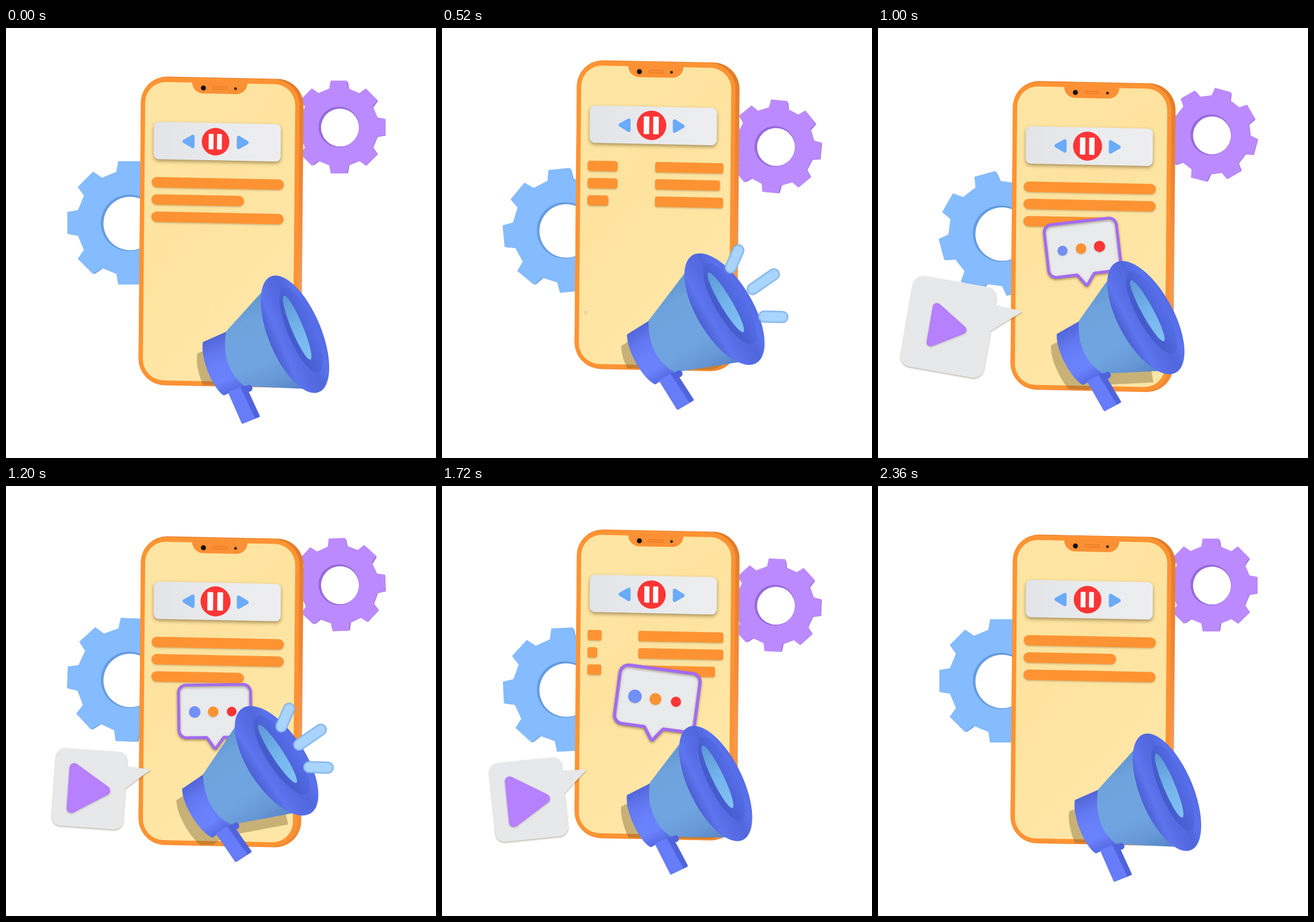
An HTML page with a canvas that plays this animation: 748x748 px, repeating every 2400 ms.

```html
<!DOCTYPE html>
<html>
<head>
<meta charset="utf-8">
<style>
  html, body { margin: 0; width: 100%; height: 100%; overflow: hidden; background: #fff; }
  canvas { display: block; width: 748px; height: 748px; }
</style>
</head>
<body>
<canvas id="stage" width="748" height="748"></canvas>
<script>
const ctx = document.getElementById('stage').getContext('2d');
const LOOP = 2400, STEP = 40, CYCLE = 2360, HALF = CYCLE / 2, BEAT = CYCLE / 3;
const TAU = 2 * Math.PI;
const rad = deg => deg * Math.PI / 180;
const clamp01 = v => Math.min(1, Math.max(0, v));
const ease = u => (1 - Math.cos(Math.PI * clamp01(u))) / 2;

// Eased travel through a few [time, value] stops.
function travel(t, ...stops) {
  let value = stops[0][1];
  for (let i = 1; i < stops.length; i++) {
    const [t0, v0] = stops[i - 1], [t1, v1] = stops[i];
    value += (v1 - v0) * ease((t - t0) / (t1 - t0));
  }
  return value;
}

const sway = (phase, middle, c, s = 0) => middle + c * Math.cos(TAU * phase) + s * Math.sin(TAU * phase);

function layer(draw) { ctx.save(); draw(); ctx.restore(); }

function fill(color) { ctx.fillStyle = color; ctx.fill(); }

function disc(x, y, rx, color, ry = rx) {
  ctx.beginPath();
  ctx.ellipse(x, y, rx, ry, 0, 0, TAU);
  fill(color);
}

function box(x, y, w, h, r, color) {
  ctx.beginPath();
  ctx.roundRect(x, y, w, h, r);
  if (color) fill(color);
}

// Closed polygon whose points are [x, y, cornerRadius].
function roundPoly(points, color) {
  const [lx, ly] = points[points.length - 1];
  ctx.beginPath();
  ctx.moveTo((lx + points[0][0]) / 2, (ly + points[0][1]) / 2);
  points.forEach(([x, y, r = 0], i) => {
    const [nx, ny] = points[(i + 1) % points.length];
    ctx.arcTo(x, y, nx, ny, r);
  });
  ctx.closePath();
  fill(color);
}

function blend(x0, y0, x1, y1, ...colors) {
  const g = ctx.createLinearGradient(x0, y0, x1, y1);
  colors.forEach((color, i) => g.addColorStop(i / (colors.length - 1), color));
  return g;
}

function shadow(alpha, blur, dy) {
  ctx.shadowColor = `rgba(80,60,20,${alpha})`;
  ctx.shadowBlur = blur;
  ctx.shadowOffsetY = dy;
}

function gearShape(r, hole, turn, color) {
  ctx.beginPath();
  for (let i = 0; i < 8; i++) {
    for (const [offset, reach] of [[-14, .84], [-10, 1], [10, 1], [14, .84]]) {
      const a = rad(turn + i * 45 + offset);
      ctx.lineTo(Math.cos(a) * r * reach, Math.sin(a) * r * reach);
    }
  }
  ctx.closePath();
  ctx.moveTo(hole, 0);
  ctx.arc(0, 0, hole, 0, TAU);
  ctx.fillStyle = color;
  ctx.fill('evenodd');
}

function gear(x, y, r, hole, turn, color, side) {
  layer(() => {
    ctx.translate(x + 2, y + 1);
    gearShape(r - 1.5, hole - .5, turn, side);
    ctx.translate(-2, -1);
    gearShape(r, hole + 2, turn, color);
  });
}

function gears(t) {
  const phase = t / HALF;
  const turn = 135 * phase + 13 * (1 - Math.cos(TAU * phase));
  gear(214, sway(phase - 1 / 6, 349, -20), 109, 47, turn, '#85bbff', '#659be0');
  gear(579, sway(phase - 1 / 18, 191, -20), 82, 33.5, -turn, '#bb8aff', '#966adb');
}

function phoneTop(t) {
  return travel(t, [0, 84], [455, 53], [860, 94.5], [1200, 87], [1560, 53], [1860, 93], [2240, 78], [CYCLE, 84]);
}

// The phone leans slightly; inside this space its edges are upright.
function phoneSpace(t) {
  ctx.transform(1, .02, -.009, 1, 0, phoneTop(t));
  ctx.translate(0, -.02 * 253);
}

function textLines(t) {
  const first = [230, 161, 230], second = [230, 230, 161];
  const late = t >= HALF + 60, e = t - (late ? 1690 : 460);
  const [from, to] = late ? [second, first] : [first, second];
  const bars = (lengths, x, scale, edge, r) => lengths.forEach((length, i) => {
    const w = Math.min(length * scale, edge - x);
    if (w > 1) box(x, 175 + i * 30, w, 18, Math.min(r, w / 2), '#ff9333');
  });
  const leave = clamp01((e + 60) / 250);
  const enter = travel(e, [-30, 0], [270, 1.1], [400, 1]);
  shadow(.3, 3, 1.5);
  bars(from, 255 + 245 * leave, Math.max(0, 1 - 1.3 * leave * leave), 491, Math.max(3.5, 9 - 15 * leave));
  bars(to, 255, enter, 500, Math.min(9, 3 + 6 * enter));
}

function player(beat) {
  layer(() => {
    shadow(.5, 6, 3);
    box(258, 79, 221, 65, 9, blend(258, 0, 479, 0, '#e3e4e7', '#e7e8eb', '#ebecee', '#ededf0'));
  });
  roundPoly([[305, 112, 3], [329, 98, 3], [329, 126, 3]], '#6aabfa');
  roundPoly([[426, 112, 3], [402.5, 98, 3], [402.5, 126, 3]], '#6aabfa');
  layer(() => {
    const pulse = sway(beat, 1.045, -.045);
    ctx.translate(365.5, 111.5);
    ctx.scale(pulse, pulse);
    disc(0, 0, 24, '#fd3535');
    ctx.scale(pulse, pulse);
    for (const x of [-12, 2.5]) box(x, -13.5, 8.5, 27, 1, '#fafafa');
  });
}

function phone(t, beat) {
  layer(() => {
    phoneSpace(t);
    box(235, 0, 283, 537, 46, blend(0, 0, 0, 537, '#e07c2a', '#ee8634', '#f29a56', '#ee8834'));
    box(235, 1, 276, 535, 45, '#ff9333');
    box(242.5, 9.5, 261, 519, 36, blend(242, 60, 503, 300, '#fee5a3', '#fde39e', '#ffe6a6'));
    box(324, 5, 96, 23, [0, 0, 19, 19], '#fc9034');
    disc(343.5, 18.5, 4.4, '#111');
    disc(399.5, 18.5, 2.5, '#3a2a20');
    box(360, 16, 25, 4, 2);
    ctx.strokeStyle = '#d9741f';
    ctx.lineWidth = 1;
    ctx.stroke();
    player(beat);
    textLines(t);
  });
}

function playBubble(t) {
  const phase = t / HALF;
  const size = travel(t, [480, 0], [1000, 1.3], [1200, 1.1], [1720, 1.12], [2040, 1.23], [2260, 0]);
  if (size < .01) return;
  layer(() => {
    ctx.translate(252, 493);
    ctx.rotate(rad(sway(phase, .6, 4.4, -8.3)));
    ctx.scale(size, size);
    layer(() => {
      shadow(.4, 3, 1.5);
      roundPoly([[-151, -24, 14], [-38, -24, 14], [-38, -2, 1], [0, 0], [-38, 33, 1], [-38, 99, 14], [-151, 99, 14]], '#e7e8ea');
    });
    ctx.translate(-94.4, 37.6);
    const icon = sway(phase, 1.16, 0, .15) / Math.max(1, size);
    ctx.scale(icon, icon);
    shadow(.3, 3, 1);
    roundPoly([[-32, -42, 7], [37, 1, 7], [-32, 43, 7]], '#b680ff');
  });
}

function chatBubble(t) {
  const phase = t / HALF;
  const size = travel(t, [610, 0], [900, 1.1], [1200, 1.09], [2040, 1.28], [2260, 0]);
  if (size < .01) return;
  layer(() => {
    ctx.translate(364, sway(phase, 454, 7.7, 6.5));
    ctx.rotate(rad(sway(phase, 2, -3.6, 8)));
    ctx.scale(size, size);
    layer(() => {
      shadow(.45, 4, 2);
      roundPoly([[-57.5, -107, 12], [57.5, -107, 12], [57.5, -23, 12], [14, -23, 2], [0, -4, 2], [-13, -23, 2], [-57.5, -23, 12]], '#e9eaec');
      ctx.lineWidth = 4.5;
      ctx.strokeStyle = '#a26bf2';
      ctx.stroke();
    });
    shadow(.25, 2, 1);
    const tilt = sway(phase, .7, -.1, 1.4);
    ['#7190fa', '#ff9333', '#fb3535'].forEach((color, i) =>
      disc(-2.5 + (i - 1) * 29.5, -64, 8.4 + tilt * (1 - i), color));
  });
}

function bandPath() {
  ctx.moveTo(3, -52);
  ctx.lineTo(47, -52);
  ctx.quadraticCurveTo(14, 0, 38, 47);
  ctx.lineTo(-1, 48);
  ctx.bezierCurveTo(-14, 30, -13, -28, 3, -52);
}

function conePath(length) {
  ctx.moveTo(46, -52);
  ctx.lineTo(length - 22, -91);
  ctx.lineTo(length + 10, 0);
  ctx.lineTo(length - 26, 92);
  ctx.lineTo(37, 47);
  ctx.quadraticCurveTo(12, 0, 46, -52);
}

function megaphone(t, beat) {
  const x = sway(beat, 346, 14.7, -10), y = sway(beat, 583, 12, -2.5);
  const angle = rad(sway(beat, -29, 5.3));
  const length = sway(beat, 160, -5, -9), depth = sway(beat, 48, -2);

  layer(() => {
    const base = ctx.getTransform();
    phoneSpace(t);
    box(236, 1, 274, 534, 44);
    ctx.clip();
    ctx.setTransform(base);
    ctx.translate(x - 10, y + 20);
    ctx.rotate(angle);
    ctx.beginPath();
    bandPath();
    conePath(length);
    fill('rgba(110,90,40,.38)');
  });

  layer(() => {
    ctx.translate(x, y);
    ctx.rotate(angle);
    ctx.beginPath();
    conePath(length);
    fill(blend(0, -92, 0, 95, '#6096cf', '#6fa3dd', '#70a4e0', '#70a4e0', '#6799d6', '#5480c8'));
    ctx.beginPath();
    bandPath();
    fill(blend(0, -52, 0, 50, '#5366d8', '#6278f0', '#6880fa', '#6a82fb', '#5468e0'));

    disc(44, 54, 6, '#4f63dc');
    roundPoly([[8, 45, 1], [41, 47, 2], [42, 107, 2], [8, 106, 2]], '#4f63dc');
    roundPoly([[8, 45, 1], [31, 46, 1], [33, 106, 2], [8, 106, 2]], '#667cf8');

    ctx.translate(length, 0);
    ctx.rotate(.02);
    disc(0, 0, depth, blend(-depth, 0, depth, 0, '#4b60d2', '#5d75ee', '#566ce4', '#5067dc', '#5a72ec', '#566ce6'), 109);
    disc(13, -3, depth * .52, blend(-12, 0, 38, 0, '#4359c8', '#4c63d8', '#566eea'), 80);
    disc(8, -9, 10, blend(0, -64, 0, 50, '#5f9ad8', '#74b4ec', '#82c2f4'), 60);
  });

  rays(beat, x + Math.cos(angle) * length, y + Math.sin(angle) * length);
}

function rays(beat, cx, cy) {
  const grow = Math.sin(Math.PI * clamp01((beat - .36) / .46));
  if (grow < .01) return;
  const reach = 1 + (beat - .525) * 1.2, width = 21 * Math.min(1, grow * 2);
  ctx.lineCap = 'round';
  for (const [x, y, dx, dy] of [[15, -75, 7.5, -17], [58, -41, 21, -14.5], [73, 11.5, 18, .5]]) {
    const px = cx + x * reach, py = cy + y * reach;
    ctx.beginPath();
    ctx.moveTo(px - dx * grow, py - dy * grow);
    ctx.lineTo(px + dx * grow, py + dy * grow);
    for (const [inset, color] of [[0, '#79a9dc'], [2, '#8fc4f8'], [6, '#a9d4ff']]) {
      ctx.lineWidth = Math.max(.5, width - inset);
      ctx.strokeStyle = color;
      ctx.stroke();
    }
  }
}

function render(now) {
  const t = Math.floor(now % LOOP / STEP) * STEP % CYCLE;
  const beat = t % BEAT / BEAT;
  ctx.fillStyle = '#fff';
  ctx.fillRect(0, 0, 748, 748);
  gears(t);
  phone(t, beat);
  chatBubble(t);
  playBubble(t);
  megaphone(t, beat);
}

let start;
function frame(now) {
  start ??= now;
  render(now - start);
  requestAnimationFrame(frame);
}
render(0);
requestAnimationFrame(frame);
</script>
</body>
</html>
```
